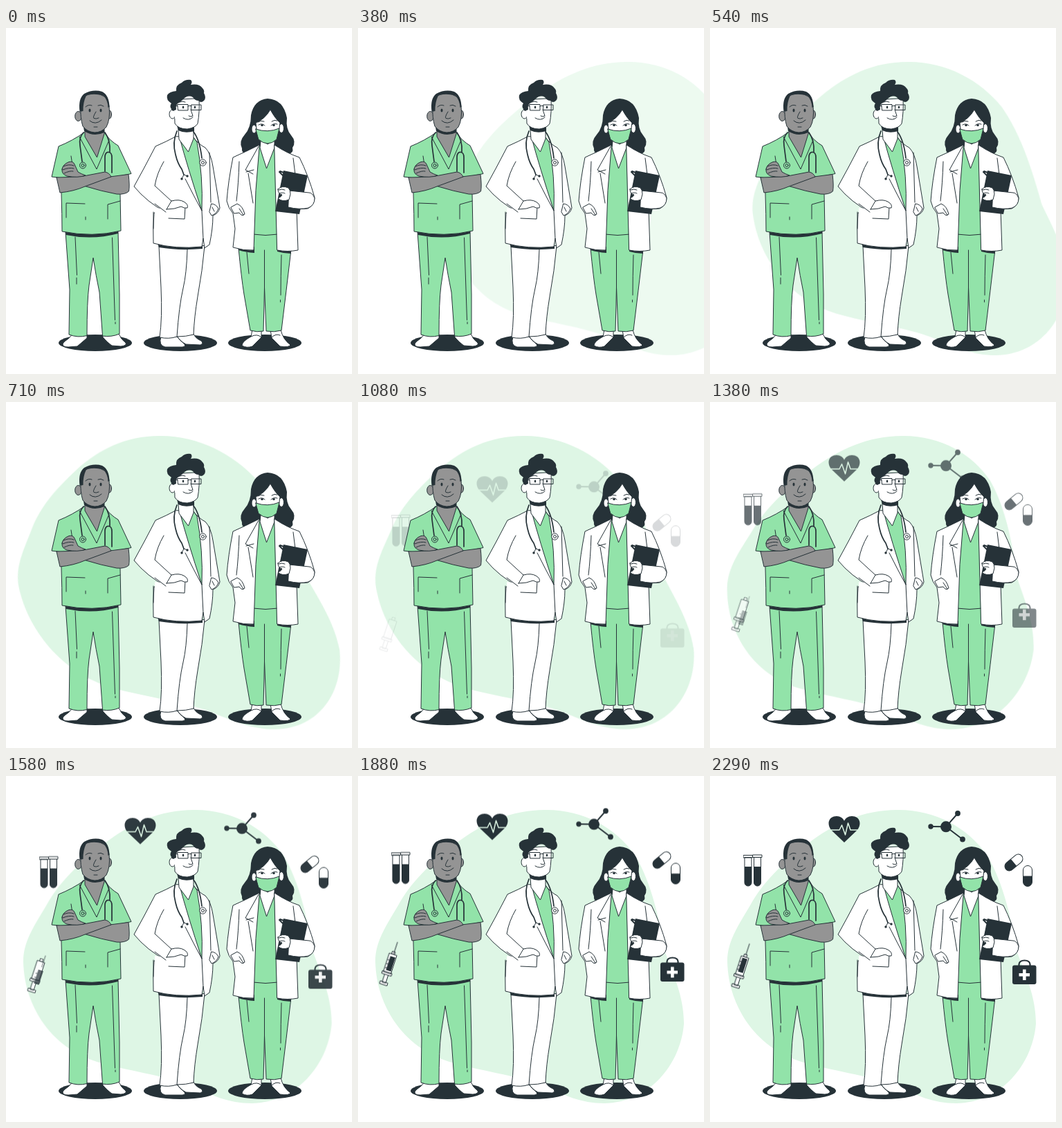
Animation, 500 px wide and 500 px high, one loop 2330 ms. Source, as an HTML page:

```html
<!DOCTYPE html>
<html lang="en">
<head>
<meta charset="utf-8">
<title>Medical team</title>
<style>
html, body { margin: 0; width: 100%; height: 100%; overflow: hidden; background: #fff; }
svg { display: block; width: 100vw; height: 100vh; }
#blob { transform-origin: 248px 261px; fill: #def6e5; }
.ln { fill: none; stroke: #263238; stroke-width: 1; stroke-linecap: round; stroke-linejoin: round; }
.w { fill: #fff; }
.g { fill: #92e3a9; }
.s { fill: #949494; }
.d { fill: #263238; stroke: none; }
.t { fill: none; stroke-width: 1.7; }
</style>
</head>
<body>
<svg viewBox="0 0 500 500">
<path id="blob" d="M270 49C222 49 180 68 141 98C104 127 76 154 58 187C39 219 25 240 25 268C26 305 38 332 52 354C72 383 98 402 132 413C175 426 228 432 268 448C298 461 322 473 356 473C420 472 466 418 471 358C471 318 455 285 444 255C435 205 424 154 400 114C372 74 324 48 270 49Z"/>

<g class="ln">
  <g id="tubes">
    <path class="w" d="M50 118V154a5 5 0 0 0 10 0V118ZM63.500 118V154a5 5 0 0 0 10 0V118ZM48.500 114.500h13v3.500h-13ZM62 114h13v3.500h-13Z"/>
    <path class="d" d="M50 131h10V154a5 5 0 0 1-10 0ZM63.500 131h10V154a5 5 0 0 1-10 0Z"/>
  </g>
  <g id="heart">
    <path class="d" d="M194 96L175 78C169 70 171 61 179 58.500C186 56.500 192 60 194 65C196 60 202 56.500 209 58.500C217 61 219 70 213 78Z"/>
    <path d="M173 78H187L190.500 71L195.500 85L199.500 68L203 78H215" stroke="#def6e5" stroke-width="1.500"/>
  </g>
  <g id="molecule">
    <path d="M319 73L341 73.300L358 54M341 73.300L365 91.500" stroke-width="2"/>
    <circle class="d" cx="341" cy="73.300" r="8"/>
    <circle class="d" cx="319" cy="73" r="3.700"/>
    <circle class="d" cx="358" cy="54" r="3.900"/>
    <circle class="d" cx="365" cy="91.500" r="3.900"/>
  </g>
  <g id="pills">
    <g transform="translate(439 125) rotate(50)">
      <rect class="w" x="-6.500" y="-15" width="13" height="30" rx="6.500"/>
      <path class="d" d="M-6.500 0H6.500V8.500a6.500 6.500 0 0 1-13 0Z"/>
    </g>
    <g transform="translate(459 144.500)">
      <rect class="w" x="-6.500" y="-15" width="13" height="30" rx="6.500"/>
      <path class="d" d="M-6.500 0H6.500V8.500a6.500 6.500 0 0 1-13 0Z"/>
    </g>
  </g>
  <g id="bag">
    <path d="M446.500 275V272Q447 266.500 454.500 266.500Q462 266.500 462.500 272V275" stroke-width="2.200"/>
    <rect class="d" x="437" y="273.500" width="34.500" height="27.500" rx="3"/>
  </g>
  <path id="cross" d="M454.300 279.500V295M446.500 287.300H462" stroke="#fff" stroke-width="4.600" stroke-linecap="butt"/>
  <g id="barrel"><g transform="translate(46.500 275) rotate(18)">
    <path class="w" d="M-2-18H2V-14H-2ZM-2.500 15H2.500V29H-2.500ZM-5.500 28H5.500V32H-5.500Z"/>
    <path class="w" d="M-5.500-14H5.500V14H-5.500ZM-7 13H7V17H-7Z"/>
  </g></g>
  <g id="needle"><g transform="translate(46.500 275) rotate(18)">
    <path d="M0-34V-17"/>
    <path class="d" d="M-3.500-12H4V9H-3.500Z"/>
    <path d="M-5.500-6h3M-5.500 0h3M-5.500 6h3"/>
  </g></g>
</g>

<g class="d">
  <ellipse cx="129" cy="455" rx="53" ry="12"/>
  <ellipse cx="252" cy="455" rx="53" ry="12"/>
  <ellipse cx="374" cy="455" rx="53" ry="12"/>
</g>

<g id="nurse" class="ln">
  <path class="w" d="M95 443C92 450 83 452 82 457Q82 461 90 461L103 460Q110 454 117 448V443ZM140 443V447Q147 455 153 459L166 460Q175 459 173 455Q166 450 163 442Z"/>
  <path class="g" d="M86 295L92 378L91 443Q104 448 117 444.500Q117 395 120 372L126 332Q130 358 135 382L139.500 445Q152 447 164 442V385L162 294Z"/>
  <path d="M100 302L102.500 357M102 361V370M153.500 303L157.500 422M158 425V427.500"/>
  <path class="d" d="M86 292Q125 303 162 291V297Q125 307 86.500 299Z"/>
  <path class="g" d="M113 151Q96 163 76 171L66 215L82 217L80 240Q81 270 81 294Q125 303 166 293L165 240L164 214L181 210.500L162 170Q150 163 142 151Z"/>
  <path d="M94 185L96 198M87 274V253L114 254M115 273V277M147 276V255L165 250"/>
  <path d="M106 157L131 204L149 162"/>
  <path class="s" d="M114 143V157L131.500 187L142 153V143Z"/>
  <path class="d" d="M112 143Q127 154 142 146V151Q127 158 113 149Z"/>
  <ellipse class="s" cx="104.500" cy="127.500" rx="4.800" ry="7"/>
  <ellipse class="s" cx="149.500" cy="125" rx="3" ry="6"/>
  <path class="s" d="M108 112Q108 95 127 95Q148 95 149 113Q151 132 145 143Q138 151 128 151Q117 150 111 142Q107 130 108 112Z"/>
  <path class="d" d="M106.500 121Q104 102 113 95Q126 88 139 92Q149 97 149.500 114L147.500 115Q147 104 141 98Q128 93.500 116 97.500Q111 108 111.500 120Z"/>
  <path d="M115 114Q119 110 124 112M133 112Q137 110 141 113M130 121Q125 129 127 130.500Q130 132 134 130M121 134Q129 141 138 133M127 143H132"/>
  <ellipse class="d" cx="121" cy="119" rx="1.500" ry="2.500"/>
  <ellipse class="d" cx="137" cy="119" rx="1.500" ry="2.500"/>
  <path class="t" d="M112 151Q105 158 107 170L110 193M143 151Q151 162 150 179M143 207V186Q143.500 179 148.500 179.500Q153 180 153 187V209"/>
  <circle class="g" cx="111" cy="198.500" r="4.500"/>
  <circle cx="111" cy="198.500" r="2"/>
  <path class="s" d="M114 228.500L150 215L177 211.500Q179 228 177.500 236Q172 241 160 240Q138 236 114 228.500Z"/>
  <path class="s" d="M73 216L78 238Q98 236 114 229L152 215Q149 209 143 208L112 214Q90 216 73 216Z"/>
  <path class="s" d="M81 204Q82 197 91 193.500Q97 192 99 197L104 208Q109 211 115 213Q104 217 88 214Q80 211 81 204Z"/>
  <path d="M83 200Q91 196 98 199M82 205Q91 201 98 203M84 210Q92 206 97 207"/>
</g>

<g id="doctor" class="ln">
  <path class="w" d="M224 446Q220 459 230 461H255Q261 460 257 456Q252 452 247 446ZM247 445Q252 453 260 457L281 458Q286 456 282 452Q274 449 271 442Z"/>
  <path class="w" d="M221 315L224 375Q226 420 222 447Q235 450 247 446Q260 446 271 443Q272 418 277 388Q284 350 287 315Z"/>
  <path d="M262 320Q261 355 256 376Q250 402 247 446"/>
  <path class="d" d="M219 311Q250 318 284 314V319Q250 322 221 317Z"/>
  <path class="w" d="M245 157Q232 164 216 171Q200 202 185 229Q204 252 231 266L214 267Q212 290 213 311Q245 320 283 316L285 304L287 318L294 313Q299 290 299 271Q307 268 309 260Q304 230 299 200Q296 181 288 173Q278 168 270 157Z"/>
  <path class="w" stroke="none" d="M215 260L236 262V275H215Z"/>
  <path d="M231 266L215 254M213 266V290"/>
  <path class="g" d="M251 159Q262 200 283 264Q285 215 276 165L270 157Z"/>
  <path class="w" d="M249 146L250 161L263.500 179L271 160V146Z"/>
  <path class="d" d="M247 141Q260 148 272 143V149Q259 153 249 148Z"/>
  <path d="M259 218Q271 242 283 264"/>
  <path d="M228 193Q218 210 215 228L239 250M283 264L285 305M294 180L296 252M235 275L258 276L259 258"/>
  <path class="w" d="M232 262L239 250Q250 247 257 251Q264 255 262 260Q258 261 253 258Q244 262 232 262Z"/>
  <path class="w" d="M297 254Q303 254 307 261Q304 269 297 271L294 266Z"/>
  <path d="M298 259L301 265"/>
  <path class="t" d="M247 149Q240 165 245 183Q248 196 254 204L257 212M271 150Q280 162 283 188"/>
  <path d="M257 212L254 218M257 212L262 214"/>
  <circle class="d" cx="254" cy="218" r="1.700"/>
  <circle class="d" cx="262" cy="214" r="1.700"/>
  <circle class="w" cx="284.500" cy="194.500" r="4.700"/>
  <circle cx="284.500" cy="194.500" r="2"/>
  <path class="w" d="M243 104L244 138Q249 146 262 146Q274 144 277 138Q280 122 279 102Z"/>
  <ellipse class="w" cx="240.500" cy="124.500" rx="4.500" ry="6.500"/>
  <path class="w" stroke="none" d="M243 118H247V131H244Z"/>
  <path class="d" d="M241 120Q235 113 239 109Q231 104 233 97Q236 92 246 91Q245 82 254 79Q259 74 267 75Q270 78 267 82Q279 80 284 87Q287 90 286 94Q290 101 286 105Q282 109 278 105Q273 105 270 100Q263 96 256 103Q251 108 248 109Q245 112 246 118Z"/>
  <path d="M248 110.500H263V119H249ZM268 111H282V118.500H268ZM263 113Q265 111 268 113M244 112L248 113"/>
  <ellipse class="d" cx="256" cy="114.500" rx="1.200" ry="2"/>
  <ellipse class="d" cx="273" cy="114.500" rx="1.200" ry="2"/>
  <path d="M267 118L270 127Q267 129 264 127M256 130Q264 135 270 129M251 107Q255 105 259 107"/>
</g>

<g id="surgeon" class="ln">
  <path class="w" d="M356 436L354 446Q341 453 341 459Q348 463 356 460L369 447V436ZM382 436L384 448L396 460Q409 462 411 458Q400 450 397 436Z"/>
  <path class="g" d="M336 318Q340 360 344 385L353 437Q363 440 372 438L373.500 375L376 438Q388 440 398 437Q405 380 412 320L392 296H357Z"/>
  <path d="M373.500 321V375M348 324L351 355M398 328Q397 360 397 386M396.500 393V396"/>
  <path d="M354 446Q363 441 369 447M384 447Q390 441 396 444"/>
  <path class="d" d="M335 316H359V325Q346 324 336 321ZM392 316H412V326Q402 326 392 323Z"/>
  <path class="d" d="M378 102Q358 104 354 126Q354 144 345 154Q336 164 341 174Q340 182 352 184Q361 182 364 172H394Q398 184 408 182Q416 181 414 173Q420 164 412 155Q404 146 406 130Q401 103 378 102Z"/>
  <path class="g" d="M364 171L357 298Q375 301 393 298L392 178L388 171Z"/>
  <path class="w" d="M368 164L367 173L376.500 203L388 173V164Z"/>
  <path class="w" d="M366 169Q346 179 328 187Q321 222 319 250Q321 260 328 268L331 290L328 317Q344 322 358 321L361 235Z"/>
  <path d="M337 193Q336 225 333 250M358 205L347 208M365 171L346 205L357 211M350 210L357 253"/>
  <path class="w" d="M325 259L334 254Q342 257 345 269Q341 273 337 267L330 268Z"/>
  <path d="M337 261L343 270"/>
  <path class="w" d="M388 169Q406 181 424 187Q437 213 446 245Q446 256 436 261L420 262L422 321Q407 324 392 321Z"/>
  <path d="M415 188L418 212"/>
  <path class="d" d="M401 206L436 213L424 269L389 265Z"/>
  <path d="M395 208L400 213M396 207L404 210" stroke-width="2"/>
  <path class="w" d="M409 235L438 238Q443 238 446 246Q446 256 437 260Q424 263 408 259Z"/>
  <path class="w" d="M393 233Q399 227 408 231Q411 234 411 240L409 248Q399 252 393 246Q398 244 399 241Q393 240 393 233Z"/>
  <path d="M394 234Q399 232 403 234M395 239Q400 237 403 239"/>
  <ellipse class="w" cx="358.500" cy="146" rx="3.500" ry="6"/>
  <ellipse class="w" cx="398" cy="145" rx="3.500" ry="6.500"/>
  <path class="w" d="M361 137Q361 159 378 168Q395 160 396 137Q389 131 382 118Q374 132 361 137Z"/>
  <path class="g" d="M361 146Q378 152 395 145L391 161Q378 173 365 161Z"/>
  <path d="M365 140Q370 137 374 141M383 141Q387 137 392 139M364 136Q368 133 373 135M384 135Q388 132 392 134"/>
  <ellipse class="d" cx="370" cy="140.500" rx="1.800" ry="1.500"/>
  <ellipse class="d" cx="387" cy="140.500" rx="1.800" ry="1.500"/>
</g>
</svg>
<script>
const LOOP = 2330, RISE = 1200;
const EASE = 'cubic-bezier(.36,-.01,.5,1.38)';

// rows: [time in ms, transform, opacity, easing to the next row]
function play(id, rows) {
  const frames = rows.map(([ms, transform, opacity, easing = EASE]) =>
    ({ offset: ms / LOOP, transform, opacity, easing }));
  document.getElementById(id).animate(frames, { duration: LOOP, iterations: Infinity });
}

const sweep = (x, deg) => `translateX(${x}px) skewX(${deg}deg)`;
play('blob', [
  [0, sweep(247, -19.6), 0, 'cubic-bezier(.337,.14,.499,1.362)'],
  [1012, sweep(0, 10), 1],
  [1372, sweep(0, -2), 1],
  [1732, sweep(0, 0), 1],
  [LOOP, sweep(0, 0), 1]
]);

const rise = {
  tubes: 815, heart: 815, molecule: 815, pills: 815,
  cross: 830, bag: 876, barrel: 876, needle: 1000
};
for (const [id, start] of Object.entries(rise)) {
  const low = 'translateY(60px)', rest = 'translateY(0px)';
  play(id, [[0, low, 0], [start, low, 0], [start + RISE, rest, 1], [LOOP, rest, 1]]);
}
</script>
</body>
</html>
```
